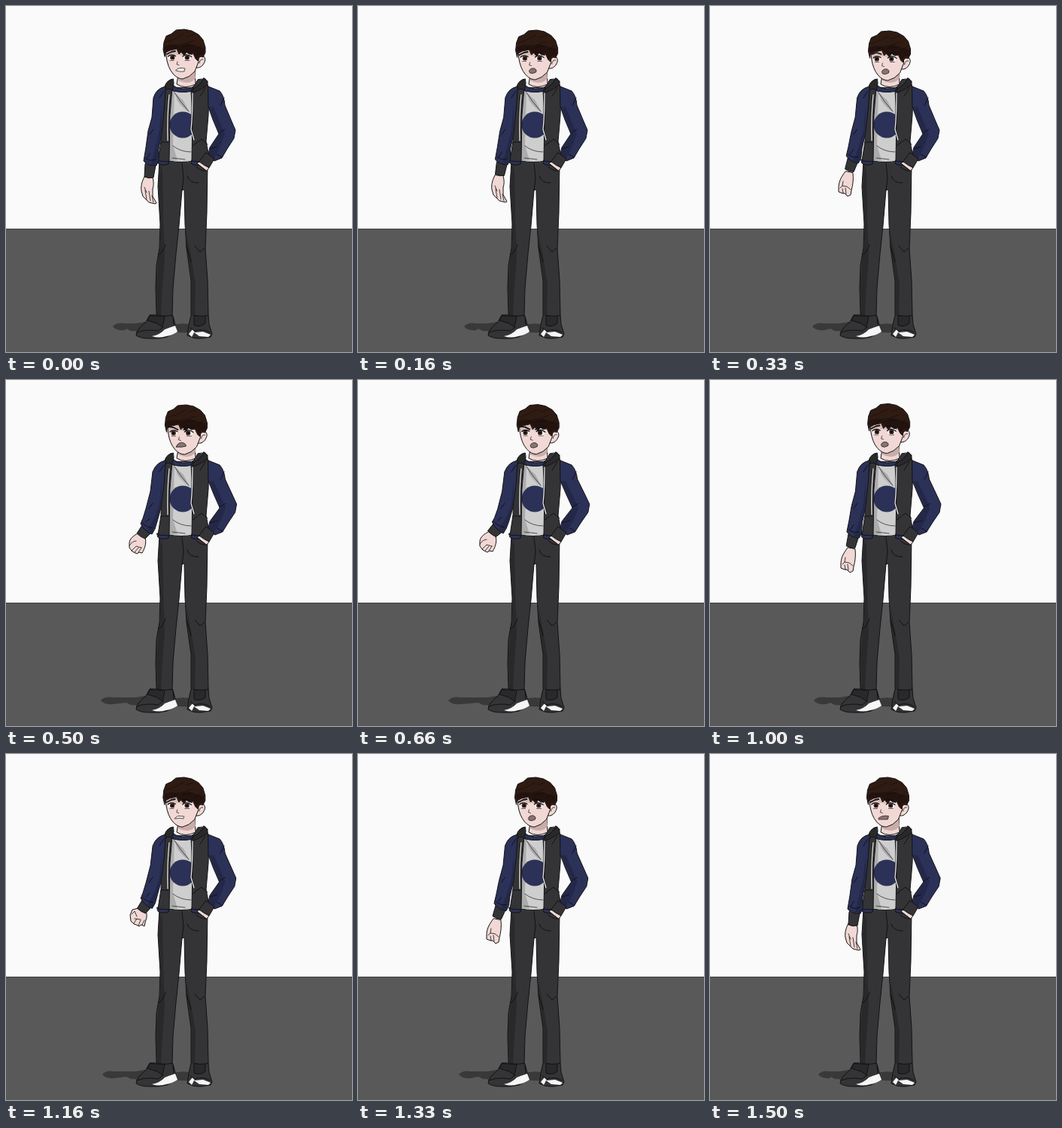
An HTML page for the animation above (1.66 s loop, 460 by 460 pixels).

```html
<!DOCTYPE html>
<html lang="en">
<head>
<meta charset="utf-8">
<title>Talking figure</title>
<style>
  html, body { margin: 0; width: 100%; height: 100%; overflow: hidden; background: #fafafa; }
  svg { display: block; width: 100%; height: 100%; }
  .ink { stroke: #111214; stroke-width: 1; stroke-linejoin: round; stroke-linecap: round; }
  .line { fill: none; }
  .skin { fill: #f1d8d4; }
  .navy { fill: #2c3158; }
  .navy-dark { fill: #242848; }
  .black { fill: #343436; }
  .black-dark { fill: #29292b; }
  .white { fill: #f6f6f6; }
  .hair { fill: #301b13; }
</style>
</head>
<body>
<svg viewBox="0 0 460 460">
  <rect y="296" width="460" height="164" fill="#595959"/>
  <path d="M0 296.5H460" stroke="#3b3b3b"/>
  <path id="shadow" fill="#393939"/>
  <path d="M220 425Q230 421 244 423L246 434Q234 435 220 433Z" fill="#393939"/>

  <g id="shoes" class="ink">
    <path class="black" d="M191 411L186 420Q177 427 174 433L173 438Q179 442 190 442Q204 443 214 440L227 433L224 420L222 412Z"/>
    <path class="white" d="M194 439Q205 437 211 430Q216 428 225 425L228 433Q221 438 213 439Q203 442 194 439Z" stroke="none"/>
    <path class="black-dark" d="M191 412L188 418L201 422L208 427L211 413Z"/>
    <path class="line" d="M174 434Q187 429 202 432L209 427M222 414L223 424"/>
    <path class="black" d="M246 411L243 424L241 438Q250 443 259 442L272 440L274 436L270 423L269 411Z"/>
    <path class="white" d="M243 436L248 430L251 434L262 433L272 437L269 440L257 439L250 434L247 440Z" stroke="none"/>
    <path class="black-dark" d="M250 412L250 424Q257 428 265 422L265 412Z"/>
    <path class="line" d="M245 428L251 432Q262 428 271 434"/>
  </g>

  <g id="trousers" class="ink">
    <path class="black" d="M204 206L202 240L205 290L204 322L200 345L199 375L200 410Q209 414 221 411L222 375L226 330L230 292L234 245L237 244L238 290L240 322L246 365L246 410Q258 414 269 411L268 365L265 322L267 275L268 208Z"/>
    <path class="black-dark" stroke="none" d="M205 208L203 240L206 290L204 325L200 365L201 410L206 411L208 374L211 335L209 285L208 220Z"/>
    <path class="black-dark" stroke="none" d="M238 292L241 322L247 366L247 411L251 411L252 370L246 333Z"/>
    <path class="line" d="M234 209L236 229L234 245M241 226Q244 236 256 235M203 331Q209 327 212 317M264 322L258 327L251 319M246 340L240 319M253 214Q260 220 267 219"/>
  </g>

  <g id="torso" class="ink">
    <path d="M219 108L250 109L249 206Q234 209 216 206Z" fill="#cecece"/>
    <path d="M220 114L224 113L222 185L228 205L217 206Z" fill="#acacac" stroke="none"/>
    <path d="M224 115L236 126L244 142Q234 135 228 126Z" fill="#acacac" stroke="none"/>
    <path class="line" d="M224 115Q232 128 243 140M222 186Q232 194 246 194M221 202L238 204" stroke-opacity=".65"/>
    <circle class="navy" cx="235" cy="158" r="17.5" stroke="none"/>
    <path class="navy" d="M221 103Q224 110 236 110Q248 110 253 104L253 111Q241 117 222 113Z"/>
    <path class="navy" d="M201 204L217 205L216 210Q207 213 202 209ZM247 205L266 203L263 211Q253 213 247 210Z"/>
    <path class="black" d="M219 98L210 111L207 140L206 180L202 206L217 207L218 145L221 108Z"/>
    <path class="black" d="M255 98L246 113L248 145L247 206L258 207L270 201L266 180L269 145L270 110L265 97Z"/>
    <path class="black-dark" d="M222 97Q214 98 211 107L211 112Q218 108 221 113L223 103Z"/>
    <path class="black-dark" d="M263 96L268 100L268 105Q257 113 247 116L249 110Q259 105 263 96Z"/>
    <path class="line" d="M206 181L216 181M248 186L260 177L268 184M258 120L265 109"/>
    <path class="line" d="M217 118Q214 148 215 179M248 116Q248 145 246 164L250 178" style="stroke:#18181a;stroke-width:2.5"/>
    <path class="line" d="M217 118Q214 148 215 179M248 116Q248 145 246 164L250 178" style="stroke:#ececec;stroke-width:1.3"/>
  </g>

  <g class="ink">
    <path class="skin" d="M254 209L259 206L270 215L267 219Z"/>
    <path id="farSleeve" class="navy"/>
    <path id="farShade" class="navy-dark" stroke="none"/>
    <path id="farFolds" class="line"/>
    <path class="black" d="M266 195L277 203L270 215Q263 212 257 207Z"/>
  </g>

  <g class="ink">
    <path id="hand" class="skin"/>
    <path id="fingers" class="line" stroke-width=".8"/>
    <path id="cuff" class="black"/>
    <path id="sleeve" class="navy"/>
    <path id="sleeveShade" class="navy-dark" stroke="none"/>
    <path id="sleeveFolds" class="line"/>
  </g>

  <path class="skin ink" d="M229 91L227 104Q238 111 252 104L251 84Z"/>
  <path d="M229 94L251 85L252 96Q244 106 229 99Z" fill="#c9adaa"/>
  <g id="head" class="ink">
    <path class="skin" d="M255 69Q258 65 263 67Q267 71 262 78Q258 83 253 82Z"/>
    <path class="line" d="M257 76Q258 70 262 71" stroke-width=".8"/>
    <path class="skin" d="M212 55L213 67Q215 82 222 90Q228 97 235 97Q244 95 251 87L256 74L256 54Z"/>
    <path d="M213 58L255 58L252 69L247 64L239 67L229 65L214 66Z" fill="#d8bbb7" stroke="none"/>
    <g id="eyes">
      <ellipse cx="220.5" cy="68.5" rx="4.6" ry="3.7" fill="#fff" stroke="none"/>
      <ellipse cx="240.8" cy="68.5" rx="5.2" ry="3.7" fill="#fff" stroke="none"/>
      <g id="irises" fill="#432a26" stroke="none">
        <circle cx="221.3" cy="68.4" r="3.2"/><circle cx="240.8" cy="68.4" r="3.2"/>
        <g fill="#080808"><circle cx="221.3" cy="68.4" r="1.5"/><circle cx="240.8" cy="68.4" r="1.5"/></g>
      </g>
      <path class="line" d="M215.5 67Q220 63 225.5 66.5M235 67Q240 62.5 246.5 67.5" stroke-width="1.4"/>
      <path class="line" d="M218 72.5H223M238 72.5H244" stroke-width=".6"/>
    </g>
    <path class="line" d="M228 74L227 77.5L230 78.5" stroke-width=".7"/>
    <path id="mouth"/>
    <path class="hair" d="M211 67L209 58L210 48L213 40L220 37L226 32L237 31L247 33L256 38L262 45L265 55L265 62L262 68Q257 65 255 73L252 70L249 63L244 64L240 61L237 66L233 61L230 64L227 57L218 59L212 62Z"/>
    <path d="M211 60L211 53Q222 49 230 53L242 50L263 56L263 65L257 65L254 70L249 62L240 61L236 64L231 60L227 56Z" fill="#23120d" stroke="none"/>
    <path class="line" d="M213 48L226 43L236 38M222 55Q230 50 236 51L250 46M235 54L249 52M240 41L250 38M253 57L260 52" stroke-width=".8"/>
    <path id="brows" class="line" stroke-width="1.8"/>
  </g>
</svg>
<script>
const LOOP = 1660;
const el = id => document.getElementById(id);
const round = n => Math.round(n * 10) / 10;

// Blends two paths that share the same commands.
function blend(from, to, amount) {
  const ends = to.match(/-?[\d.]+/g);
  let i = 0;
  return from.replace(/-?[\d.]+/g, n => round(+n + (ends[i++] - n) * amount));
}

// Near arm: hanging, then raised.
const arm = {
  sleeve: [
    'M212 107Q200 109 196 122L194 148L189 166L186 188L183 206Q188 213 200 212L203 205L203 190L207 170L210 140Z',
    'M212 107Q200 109 195 122L192 148L186 171L182 184L179 191Q183 200 194 205L198 198L201 188L206 170L210 140Z'],
  sleeveShade: [
    'M207 130L204 165L198 190L193 210L200 211L203 190L207 168Z',
    'M207 130L204 165L198 182L188 200L194 204L201 187L206 168Z'],
  sleeveFolds: [
    'M210 113L204 122M196 164L191 171M186 203Q192 207 199 204M191 196L187 203',
    'M210 113L204 122M195 164L190 171M181 190Q187 196 195 197M191 184L186 189'],
  cuff: [
    'M185 210L184 227Q190 230 196 228L199 212Z',
    'M181 193L174 204Q179 209 185 211L193 203Z']
};

// Far arm: resting, then elbow pushed outwards.
const far = {
  farSleeve: [
    'M269 107L284 113Q290 119 291 132L299 151L305 165L303 176L294 190L287 202L277 206L269 197L271 188L283 170L275 151L269 134Z',
    'M269 107L284 113Q290 119 292 132L302 151L309 165L307 176L297 190L289 202L278 206L269 197L271 188L286 170L277 151L269 134Z'],
  farShade: [
    'M270 135L276 150L284 169L272 189L270 197L276 203L284 189L291 170L283 151L276 134Z',
    'M270 135L278 150L287 169L272 189L270 197L276 203L286 189L294 170L285 151L276 134Z'],
  farFolds: [
    'M290 122L285 132M283 169L291 164M271 190L280 187M287 201L280 197',
    'M290 122L285 132M286 169L294 164M271 190L282 187M289 201L282 197']
};

// Hands are drawn around the wrist.
const hands = {
  hang: ['M-6 -1C-9 5 -11 11 -10 18L-8 25L-4 29L0 33L4 34L8 35L10 34L5 25L5 15C7 9 6 4 5 0Z',
    'M-5 17L-3 29M0 18L2 31M4 24L6 33M-6 13L-3 20'],
  fist: ['M-5 0C-12 9 -14 15 -14 22L-14 27L-9 29L-6 29L-2 33L2 31L3 25C5 18 6 10 5 2Z',
    'M-12 22L-9 19L-3 20L2 24M-9 23L-8 29M-5 22L-4 30M-8 13L-9 19'],
  raised: ['M-4 -3C-9 0 -14 3 -15 9L-15 16L-11 21L-5 24L-2 22L2 23C6 16 8 9 6 3Z',
    'M-15 13Q-11 7 -6 7M-12 20L-6 14L1 16M-8 22L-3 16M-3 22L1 16'],
  palm: ['M-5 -3L-13 -1L-16 6L-15 14L-11 18L-8 19L-4 21L-1 19L3 21L4 16L6 9L6 4Z',
    'M-14 5L-10 1L-7 8M-11 17L-7 11M-5 20L-2 13M0 19L3 13M-10 11L-2 12']
};

const GREY = '#8b7470', TEETH = '#f4f0ef';
const mouths = {
  grit: ['M226 85Q230 81 238 83L237 87Q231 88 226 86Z', TEETH],
  open: ['M227 85Q229 81 234 82Q238 84 236 87Q231 90 228 88Z', GREY],
  frown: ['M224 87Q225 82 231 81Q237 82 237 86Q231 88 224 87Z', GREY],
  flat: ['M225 85Q229 81 232 82.5L237 83L236 86Q231 84.5 225 86Z', TEETH],
  wide: ['M225 85Q230 81 238 82.5L237 87Q230 87 225 87Z', GREY],
  small: ['M229 85Q230 81 233 82Q235 86 232 87Q229 88 229 85Z', '#d9a9a5']
};

const brows = {
  worried: 'M214 64L220 61L225 60M235 60L241 61L247 64',
  calm: 'M214 62L220 60L226 62M235 62L241 60L248 62',
  stern: 'M214 60L220 61L226 64M234 64L241 61L248 61'
};

// start, arm raise, head x, head y, elbow, shadow tip, hand, wrist x, wrist y, mouth, brows, gaze
const poses = [
  [0, 0, 0, 0, 0, 142, 'hang', 190, 228, 'grit', 'worried', 0],
  [160, .15, .6, 1, 0, 141, 'hang', 188, 226, 'open', 'worried', 0],
  [330, .45, 1.5, 2, 0, 136, 'fist', 185, 220, 'open', 'calm', -1],
  [500, 1, 2.4, 2, .4, 126, 'raised', 179, 207, 'frown', 'stern', -1],
  [660, 1.15, 2.2, 1.6, .7, 120, 'raised', 177, 205, 'open', 'stern', -1],
  [830, .92, 1.5, 1, 1, 129, 'raised', 180, 211, 'small', 'calm', -.5],
  [1000, .28, .6, .5, .5, 138, 'fist', 188, 223, 'open', 'worried', 0],
  [1160, .95, -.2, 0, .2, 128, 'palm', 181, 208, 'flat', 'worried', 0],
  [1330, .5, -.5, 0, .2, 134, 'fist', 185, 219, 'open', 'worried', 0],
  [1500, 0, -.6, 0, .3, 144, 'hang', 190, 226, 'wide', 'worried', 0]
];

const setPath = (id, d) => el(id).setAttribute('d', d);
const shift = (id, x, y) => el(id).setAttribute('transform', `translate(${x} ${y})`);
const blendAll = (parts, amount) => {
  for (const id in parts) setPath(id, blend(...parts[id], amount));
};

function show([, raise, headX, headY, elbow, tip, hand, x, y, mouth, brow, gaze]) {
  blendAll(arm, raise);
  blendAll(far, elbow);
  setPath('hand', hands[hand][0]);
  setPath('fingers', hands[hand][1]);
  shift('hand', x, y);
  shift('fingers', x, y);
  shift('head', headX, headY);
  shift('irises', gaze, 0);
  setPath('mouth', mouths[mouth][0]);
  el('mouth').setAttribute('fill', mouths[mouth][1]);
  el('mouth').setAttribute('stroke-width', .7);
  setPath('brows', brows[brow]);
  setPath('shadow', `M${tip} 426Q${tip + 5} 420 ${tip + 16} 422L172 422L190 419L184 433L166 432L160 429L${tip + 16} 431Q${tip + 4} 432 ${tip} 426Z`);
}

let current;
function tick(now) {
  const time = now % LOOP;
  const pose = poses.findLast(p => p[0] <= time);
  if (pose !== current) show(current = pose);
  requestAnimationFrame(tick);
}
const begin = performance.now();
const run = now => tick(Math.max(0, now));
show(poses[0]);
requestAnimationFrame(function frame() {
  const time = (performance.now() - begin) % LOOP;
  const pose = poses.findLast(p => p[0] <= time) || poses[0];
  if (pose !== current) show(current = pose);
  requestAnimationFrame(frame);
});
</script>
</body>
</html>
```
